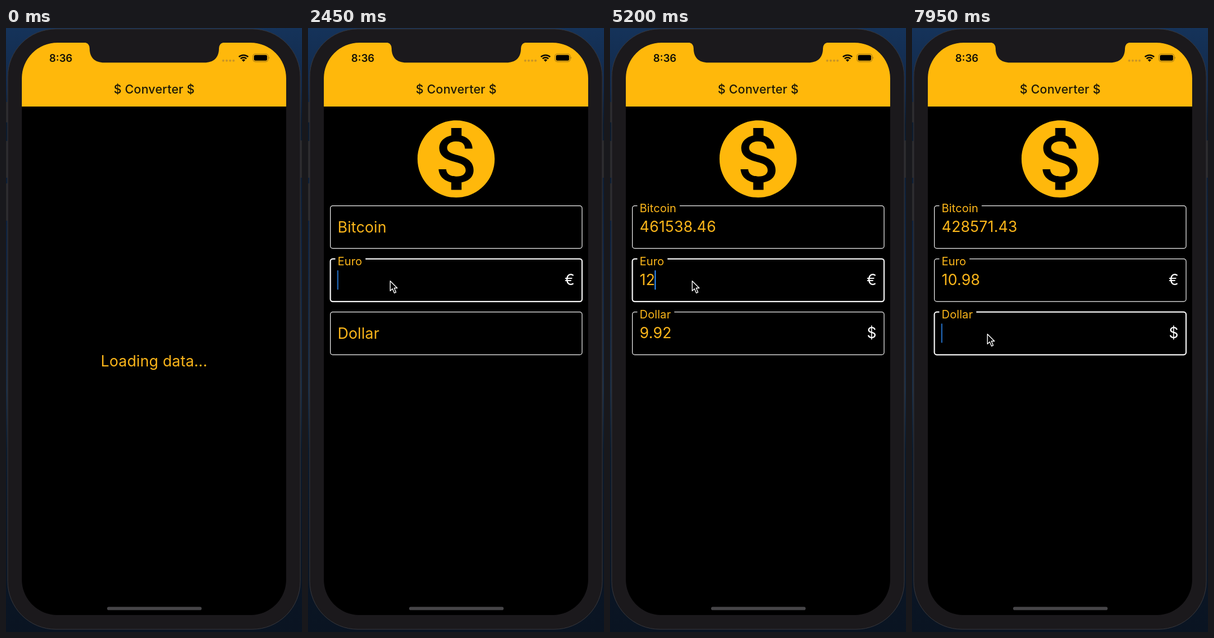
Recreate the animation shown at these times as an HTML page. Size 524x1069 px, loop 8 s.

```html
<!DOCTYPE html>
<html lang="en">
<head>
<meta charset="utf-8">
<title>Converter</title>
<style>
  html, body { margin: 0; width: 100%; height: 100%; overflow: hidden; background: #0a1422; }
  svg { display: block; width: 100vw; height: 100vh; }
  text { font-family: Inter, "Open Sans", sans-serif; font-size: 26.5px; letter-spacing: .2px; white-space: pre; }
  .amber { fill: #fcb61a; }
  .mid { text-anchor: middle; }
</style>
</head>
<body>
<svg viewBox="0 0 524 1069" preserveAspectRatio="none">
  <defs>
    <linearGradient id="sea" x1="0" y1="0" x2="0" y2="1">
      <stop offset="0" stop-color="#15335a"/>
      <stop offset=".1" stop-color="#12294a"/>
      <stop offset=".16" stop-color="#0d1b2c"/>
      <stop offset=".36" stop-color="#0f2340"/>
      <stop offset=".6" stop-color="#1a2c42"/>
      <stop offset=".7" stop-color="#0b1a2c"/>
      <stop offset="1" stop-color="#0a1422"/>
    </linearGradient>
    <clipPath id="screen"><rect x="28" y="26" width="468" height="1013" rx="63"/></clipPath>
  </defs>

  <rect width="524" height="1069" fill="url(#sea)"/>
  <path d="M0 131h4v36h-4z M0 200h4v65h-4z M0 275h4v66h-4z M520 199h4v66h-4z" fill="#29292b"/>
  <rect x="3" y="1.8" width="518" height="1062.4" rx="85" fill="#1b191c" stroke="#38383d" stroke-width="1"/>

  <g clip-path="url(#screen)">
    <rect x="28" y="26" width="468" height="1013"/>
    <rect x="28" y="26" width="468" height="113" fill="#ffb80b"/>
    <path d="M138 25.5 Q148 26.5 148 36 C148 52 157 61.3 174 61.3 H351 C368 61.3 377 52 377 36 Q377 26.5 387 25.5Z" fill="#1b191c"/>
  </g>
  <rect x="179" y="1024.6" width="167.3" height="5.6" rx="2.8" fill="#464548"/>

  <text x="76.5" y="59.7" style="font-size:18.4px;font-weight:600;letter-spacing:0" fill="#141006">8:36</text>
  <g fill="#c99526">
    <circle cx="384.6" cy="57.8" r="2"/><circle cx="390.7" cy="57.8" r="2"/>
    <circle cx="396.8" cy="57.8" r="2"/><circle cx="402.8" cy="57.8" r="2"/>
  </g>
  <g fill="none" stroke="#0c0a04" stroke-width="2.5">
    <path d="M412.3 51.2 A11.8 11.8 0 0 1 428.7 51.2"/>
    <path d="M415.3 54.3 A7.4 7.4 0 0 1 425.7 54.3"/>
  </g>
  <path d="M420.5 59.8 L417.4 56.6 A4.5 4.5 0 0 1 423.6 56.6Z" fill="#0c0a04"/>
  <rect x="437.2" y="46" width="26.8" height="13.6" rx="4" fill="none" stroke="#a67a12" stroke-width="1.1"/>
  <rect x="439" y="47.8" width="23.2" height="10" rx="2.4"/>
  <path d="M465.2 50.6 Q467.4 52.8 465.2 55Z" fill="#a67a12"/>
  <text class="mid" x="262.3" y="116" style="font-size:21.3px;font-weight:500" fill="#1d1808">$ Converter $</text>

  <text id="loading" class="amber mid" x="262.2" y="599">Loading data...</text>

  <g id="form">
    <path transform="translate(180.2 149.8) scale(6.83)" fill="#ffb80b" d="M12 2C6.48 2 2 6.48 2 12s4.48 10 10 10 10-4.48 10-10S17.52 2 12 2zm1.41 16.09V20h-2.67v-1.93c-1.71-.36-3.16-1.46-3.27-3.4h1.96c.1 1.05.82 1.87 2.65 1.87 1.96 0 2.4-.98 2.4-1.59 0-.83-.44-1.61-2.67-2.14-2.48-.6-4.18-1.62-4.18-3.67 0-1.72 1.39-2.84 3.11-3.21V4h2.67v1.95c1.86.45 2.79 1.86 2.85 3.39H14.3c-.05-1.11-.64-1.87-2.22-1.87-1.5 0-2.4.68-2.4 1.64 0 .84.65 1.39 2.67 1.91s4.18 1.39 4.18 3.91c-.01 1.83-1.38 2.83-3.12 3.16z"/>
  </g>
  <rect id="caret" width="2.2" height="34.4" rx="1" fill="#2b84ea"/>
  <path id="pointer" d="M.5 .8 V18.2 L4.5 14.5 L7.8 22 L10.8 20.7 L7.6 13.3 H13Z" fill="#050505" stroke="#fff" stroke-width="1.4" stroke-linejoin="round"/>
</svg>
<script>
const LOOP = 8000, READY = 400, FOCUS_EURO = 2050, FOCUS_DOLLAR = 6030, FILL = 3475;
const $ = id => document.getElementById(id);
const form = $('form');

// time, Bitcoin, Euro, Dollar
const values = [
  [0, '', '', ''],
  [FILL, '38461.54', '1', '0.83'],
  [4850, '461538.46', '12', '9.92'],
  [6950, '471428.57', '12.08', '9.9'],
  [7150, '428571.43', '10.98', '9.'],
  [7350, '428571.43', '10.98', '9'],
  [7550, '428571.43', '10.98', '']
];
// time, x, y
const path = [
  [450, 524, 668], [850, 330, 446], [1400, 176, 446],
  [1760, 176, 446], [2000, 145, 447],
  [5450, 145, 447], [5900, 133, 541]
];
// each input restarts the caret blink
const inputs = [FOCUS_EURO, FILL, 4850, FOCUS_DOLLAR, 6950, 7150, 7350, 7550];

const clamp = v => Math.max(0, Math.min(1, v));
const ease = v => v * v * (3 - 2 * v);
const lerp = (a, b, k) => a + (b - a) * k;
const ramp = (t, start) => ease(clamp((t - start) / 200));
const lastAt = (list, t, key) => list.filter(v => key(v) <= t).pop();

function add(tag, attrs, text = '') {
  const el = document.createElementNS('http://www.w3.org/2000/svg', tag);
  set(el, attrs);
  el.textContent = text;
  return form.appendChild(el);
}
function set(el, attrs) {
  for (const k in attrs) el.setAttribute(k, attrs[k]);
}

function makeField(name, y, suffix, floatAt, focus) {
  return {
    y, floatAt, focus,
    box: add('rect', { x: 39.6, y, width: 445.6, height: 75.6, rx: 4.4, fill: 'none', stroke: '#f4f4f4' }),
    gap: add('rect', { x: 48.4, y: y - 2, height: 4 }),
    label: add('text', { class: 'amber' }, name),
    value: add('text', { class: 'amber', x: 52.6, y: y + 46.5 }),
    suffix: add('text', { class: 'mid', x: 463.3, y: y + 46.5, fill: '#fff' }, suffix)
  };
}
const fields = [
  makeField('Bitcoin', 314.6, '', FILL, t => 0),
  makeField('Euro', 408.6, '€', FOCUS_EURO, t => ramp(t, FOCUS_EURO) - ramp(t, FOCUS_DOLLAR)),
  makeField('Dollar', 502.7, '$', FILL, t => ramp(t, FOCUS_DOLLAR))
];

function drawField(f, text, t) {
  const up = ramp(t, f.floatAt), scale = lerp(1, .75, up);
  set(f.box, { 'stroke-width': lerp(1.2, 2.2, f.focus(t)) });
  set(f.label, { transform: `translate(52.4 ${f.y + lerp(47.6, 11.3, up)}) scale(${scale})` });
  set(f.gap, { width: up * (f.label.getComputedTextLength() * .75 + 10) });
  set(f.suffix, { opacity: up });
  if (f.value.textContent !== text) f.value.textContent = text;
}

function caretAlpha(t) {
  const start = lastAt(inputs, t, v => v);
  if (start === undefined) return 0;
  const u = (t - start) % 1000;
  return u < 600 ? clamp((600 - u) / 250) : clamp((u - 850) / 150);
}

function drawPointer(t) {
  const i = path.findIndex(p => p[0] > t);
  const b = i < 0 ? path[path.length - 1] : path[i];
  const a = i < 0 ? b : path[Math.max(0, i - 1)];
  const k = a === b ? 0 : ease((t - a[0]) / (b[0] - a[0]));
  set($('pointer'), {
    transform: `translate(${lerp(a[1], b[1], k)} ${lerp(a[2], b[2], k)})`,
    visibility: t < path[0][0] ? 'hidden' : 'visible'
  });
}

function draw(t) {
  const ready = t >= READY;
  set($('loading'), { visibility: ready ? 'hidden' : 'visible' });
  set(form, { visibility: ready ? 'visible' : 'hidden' });
  const row = lastAt(values, t, v => v[0]);
  fields.forEach((f, i) => drawField(f, row[i + 1], t));
  const active = fields[t < FOCUS_DOLLAR ? 1 : 2];
  const width = active.value.textContent ? active.value.getComputedTextLength() : 0;
  set($('caret'), { x: 51.6 + width, y: active.y + 20.2, opacity: caretAlpha(t) });
  drawPointer(t);
}

const began = performance.now();
function tick() {
  draw((performance.now() - began) % LOOP);
  requestAnimationFrame(tick);
}
tick();
</script>
</body>
</html>
```
